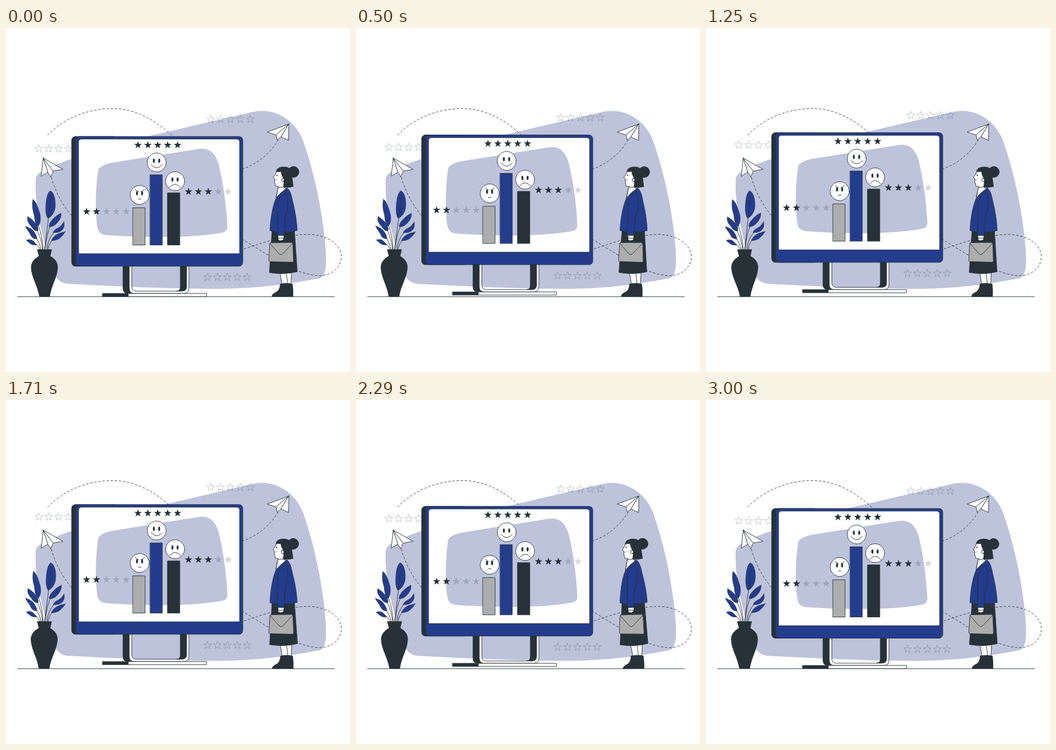
These frames come from a looping animation (600x600 px, 3040 ms). An HTML page:

```html
<!DOCTYPE html>
<html lang="en">
<head>
<meta charset="utf-8">
<title>Customer feedback</title>
<style>
  html, body { margin: 0; width: 100%; height: 100%; overflow: hidden; background: #fff; }
  svg { display: block; width: 100vw; height: 100vh; }
  .ink { fill: #263238; }
  .blue { fill: #243c8c; }
  .grey { fill: #adadad; }
  .white { fill: #fff; }
  .tint { fill: #bec3dc; }
  .edge { stroke: #263238; stroke-width: .9; stroke-linejoin: round; stroke-linecap: round; }
  .thin { stroke-width: .5; }
  .line { fill: none; }
  .dash { fill: none; stroke: #263238; stroke-width: .85; stroke-dasharray: 4.2 3; }
  .faint { fill: #263238; opacity: .2; }
  .hollow { fill: none; stroke: #263238; stroke-width: .8; opacity: .33; }
</style>
</head>
<body>
<svg viewBox="0 0 600 600">
  <path class="tint" d="M250 188.500L425 147.500C445 142 463 144 480 153C499 163 512 179 519 199C541 262 554 335 557.500 386C558.500 403 559 418 555 428C553 435 547 437 538 438C490 447 440 454 370 455C280 455 180 450 106 446C93 444 86 436 82 421C62 365 49 305 52 262C53 254 66 247 78 242Q100 233 115 228Z"/>

  <g class="dash">
    <path d="M72.500 187C103 155 146 140.500 186 140.500C225 140.500 258 160 283 182L300 196"/>
    <path d="M79 260C86 285 98 308 115 328L122 336"/>
    <path d="M475 195C463 215 443 235 415 245L405 248"/>
    <path d="M408 388C450 373 490 360 530 360C565 362 584 380 585 398C585 420 566 432 546 432C505 430 470 403 408 366"/>
  </g>

  <g class="white edge">
    <path d="M65 227L61.500 258.500L73 251.500Z"/>
    <path d="M65 227L73 251.500L78 259.500L82.500 249.500Z"/>
    <path d="M65 227L99.500 246.500L82.500 249.500Z"/>
    <path d="M493 167.500L455.500 181.500L471 186.500Z"/>
    <path d="M493 167.500L471 186.500L473 195.500L479.500 190Z"/>
    <path d="M493 167.500L479.500 190L492.500 196Z"/>
  </g>

  <path class="line edge" d="M20 468.700H573"/>

  <g id="monitor">
    <g id="hollowStars"></g>
    <g class="edge">
      <path class="ink" d="M204 414V454Q204 463 213 463H224Q215 462 215 453V414Z"/>
      <path class="ink" d="M304 414V452Q304 459 297 459H307Q315 459 315 451V414Z"/>
      <path class="white" d="M215 414V454Q215 463 224 463H310Q319 463 319 454V414H315V451Q315 459 307 459H227Q219.500 459 219.500 451V414Z"/>
      <path class="ink" d="M168.500 463H213.500V468.500H168.500Z"/>
      <path class="white" d="M213.500 463H349.500V468.500H213.500Z"/>
      <rect class="ink" x="114.500" y="189.200" width="80" height="226.300" rx="6.500"/>
      <rect class="blue" x="121.500" y="189.200" width="291.500" height="226.300" rx="6.500"/>
      <path class="white" d="M126.500 393.500V199.300Q126.500 193.800 132 193.800H402Q407.500 193.800 407.500 199.300V393.500Z"/>
    </g>
    <path class="tint" d="M160.500 249C161 243 172 237 188 234.500L335 211C355 208 365 218 371 238C379 270 385 315 386 346C386 354 382 356 374 357.500C335 364 290 365 255 364.500C225 364 195 363 174 361C164 360 160 355 158.500 342C155 310 157 275 160.500 249Z"/>
    <g class="edge">
      <path class="grey" d="M221.500 313.600H242.600V378.500H221.500Z"/>
      <path class="blue" d="M251.500 256.100H272.600V378.500H251.500Z"/>
      <path class="ink" d="M282 287.600H303.100V378.500H282Z"/>
    </g>
    <g id="faces"></g>
    <g id="solidStars"></g>
  </g>

  <g id="plant">
    <g class="blue edge thin">
      <path d="M77 284C84 286 87 300 86 312C85 322 79 330 73 332C68 325 69 312 70 303C71 294 73 287 77 284Z"/>
      <path d="M47 299C52 302 55 311 58 320C62 331 60 342 56 346C51 343 50 335 49 326C46 316 45 307 47 299Z"/>
      <path d="M38 329C45 333 50 338 54 344C56 348 57 353 55 354C50 354 46 350 44 346C39 341 36 335 38 329Z"/>
      <path d="M34 346C38 347 43 349 47 353C51 358 54 363 54 368C48 368 44 365 42 359C39 354 35 350 34 346Z"/>
      <path d="M36 370C40 368 45 369 48 372L54 378.500C48 379 44 378 41 375C39 373 36 372 36 370Z"/>
      <path d="M96 323C97 328 94 335 90 339C86 344 81 347 75 346.500C75 341 79 336 83 332C87 328 91 325 96 323Z"/>
      <path d="M101 338C102 343 102 349 97 353C93 357 87 357 82 357C84 352 88 350 92 348C96 346 98 342 101 338Z"/>
      <path d="M103.500 355C101 360 97 364 92 368C88 370 84 371 79 371C81 366 85 362 89 360C94 357 98 357 103.500 355Z"/>
    </g>
    <path class="line edge" d="M78 295Q74 335 67 387M56 343Q64 365 65 387M54 352Q62 368 64 387M53 366Q59 376 62 387M52 377Q57 380 60 387M78 344Q70 360 68.500 387M84 356Q73 368 71 387M81 370Q75 376 73 387"/>
    <path class="ink edge" d="M55 386.500H79.500L77 398C86 403 90 409 90 418C89 436 79 448 76 468.500H58.500C55 448 45 436 44 418C44 409 49 403 57.500 398Z"/>
  </g>

  <g id="woman" class="edge">
    <path class="white" d="M478 427L481.500 448H497L498 427Z"/>
    <path class="line" d="M489 428L491.500 447"/>
    <path class="ink" d="M478.500 446.500Q489 444 499.500 446.500Q501 457 500.500 468.500H464Q463.500 465 469 462Q478 459 478.500 446.500Z"/>
    <path class="ink" d="M464 353L459.500 426.500Q484 431 508 425L503 352Z"/>
    <path class="white" d="M472 250L470 255L466 261L468.500 263L468.500 269L470.500 276L476 277L473.500 284L471 295L490 284L484 276L490 262L484 249Z"/>
    <path class="line thin" d="M469.500 265.500Q472 266 473.500 264"/>
    <ellipse class="ink" cx="472.500" cy="257" rx=".5" ry="1"/>
    <path class="ink" d="M471.500 250.500C472 244 479 242 487 242.500C494 243 498 247 498 255L501 276.500Q492 279 484 277.500L485 268C481 269 480 262 484 262C482 258 480 255 480 250.500Z"/>
    <circle class="ink" cx="501.500" cy="251" r="9.500"/>
    <path class="white" d="M481.500 262.500Q485.500 261 485 266.500Q483 269 481 267Z"/>
    <path class="white" d="M475 278L484 277.500L490 281L480 287L471.500 296Z"/>
    <path class="blue" d="M490 279C495 282 498 291 500 303C505 322 507 338 508 353Q496 356.500 486 355.500L473 356.500L460.500 353.500C461 337 464 313 471 297L478 289Z"/>
    <path class="line" d="M490 280L484 293L472 309"/>
    <path class="white" d="M474 361L475 370Q480 372.500 484 369L485 361Z"/>
    <path class="blue" d="M487 289C479 289 475 297 474 315L473.500 362H484.500L487 330C492 318 495 293 487 289Z"/>
    <path class="line" d="M471.500 375V368Q471.500 366.500 473 366.500H485.500Q487 366.500 487 368V375"/>
    <path class="grey" d="M462 374.500L498 374Q500 374 500.300 376L501.500 406Q501.500 408.500 499 408.500L460 407.500Q458.300 407 458.500 405L460 377Q460 374.500 462 374.500Z"/>
    <path class="line" d="M460.500 376L476.500 394Q479.500 397 482.500 394L500 375.500"/>
  </g>
</svg>
<script>
const byId = id => document.getElementById(id);
const LOOP = 3040, CYCLE = 3000, PITCH = 17.25;

function star(cx, cy, radius, style) {
  const points = Array.from({ length: 10 }, (_, i) => {
    const r = i % 2 ? radius * 0.4 : radius;
    const a = (i * 36 - 90) * Math.PI / 180;
    return `${(cx + r * Math.cos(a)).toFixed(2)},${(cy + r * Math.sin(a)).toFixed(2)}`;
  });
  return `<polygon class="${style}" points="${points.join(' ')}"/>`;
}

function starRow(x, y, radius, styleAt) {
  return Array.from({ length: 5 }, (_, i) => star(x + i * PITCH, y, radius, styleAt(i))).join('');
}

function face(x, y, eyeGap, features) {
  const eye = ex => `<ellipse class="ink" cx="${ex}" cy="-3" rx="1.7" ry="3.8"/>`;
  return `<g transform="translate(${x} ${y})"><circle class="white edge" r="16.5"/>` +
    eye(-eyeGap) + eye(eyeGap - .5) + `<path class="line edge" d="${features}"/></g>`;
}

const rating = score => i => i < score ? 'ink' : 'faint';
byId('solidStars').innerHTML =
  starRow(230.2, 204.3, 6.9, rating(5)) +
  starRow(140.6, 320.3, 6.9, rating(2)) +
  starRow(318.4, 285.4, 6.9, rating(3));
byId('hollowStars').innerHTML = [[57.2, 210.8], [357, 159.2], [351.5, 434.8]]
  .map(([x, y]) => starRow(x, y, 7.2, () => 'hollow')).join('');
byId('faces').innerHTML =
  face(233.2, 291.2, 4.7, 'M-8 -9.5L-2 -5.5M8 -9.5L2 -5.5M-2.5 7H2.5') +
  face(262.8, 234.5, 4.9, 'M-10 3.5Q0 15.5 10 3.5') +
  face(295, 267.2, 4.8, 'M-10 11.5Q0 -1 10 11.5');

// Triangle wave 0 → 1 → 0 over one unit.
const triangle = u => 1 - Math.abs(1 - 2 * (u - Math.floor(u)));
// Linear sway 0 → 1 → -1 → 0 over one unit, in degrees.
const sway = u => 2 * triangle(u + 0.25) - 1;

function render(ms) {
  const u = Math.min(ms % LOOP, CYCLE) / CYCLE;
  byId('monitor').setAttribute('transform', `translate(0 ${-8 * triangle(u)})`);
  byId('woman').setAttribute('transform', `rotate(${sway(u)} 485 355)`);
  byId('plant').setAttribute('transform', `rotate(${sway(2 * u)} 69 376.5)`);
}

const start = performance.now();
function tick() {
  render(performance.now() - start);
  requestAnimationFrame(tick);
}
tick();
</script>
</body>
</html>
```
